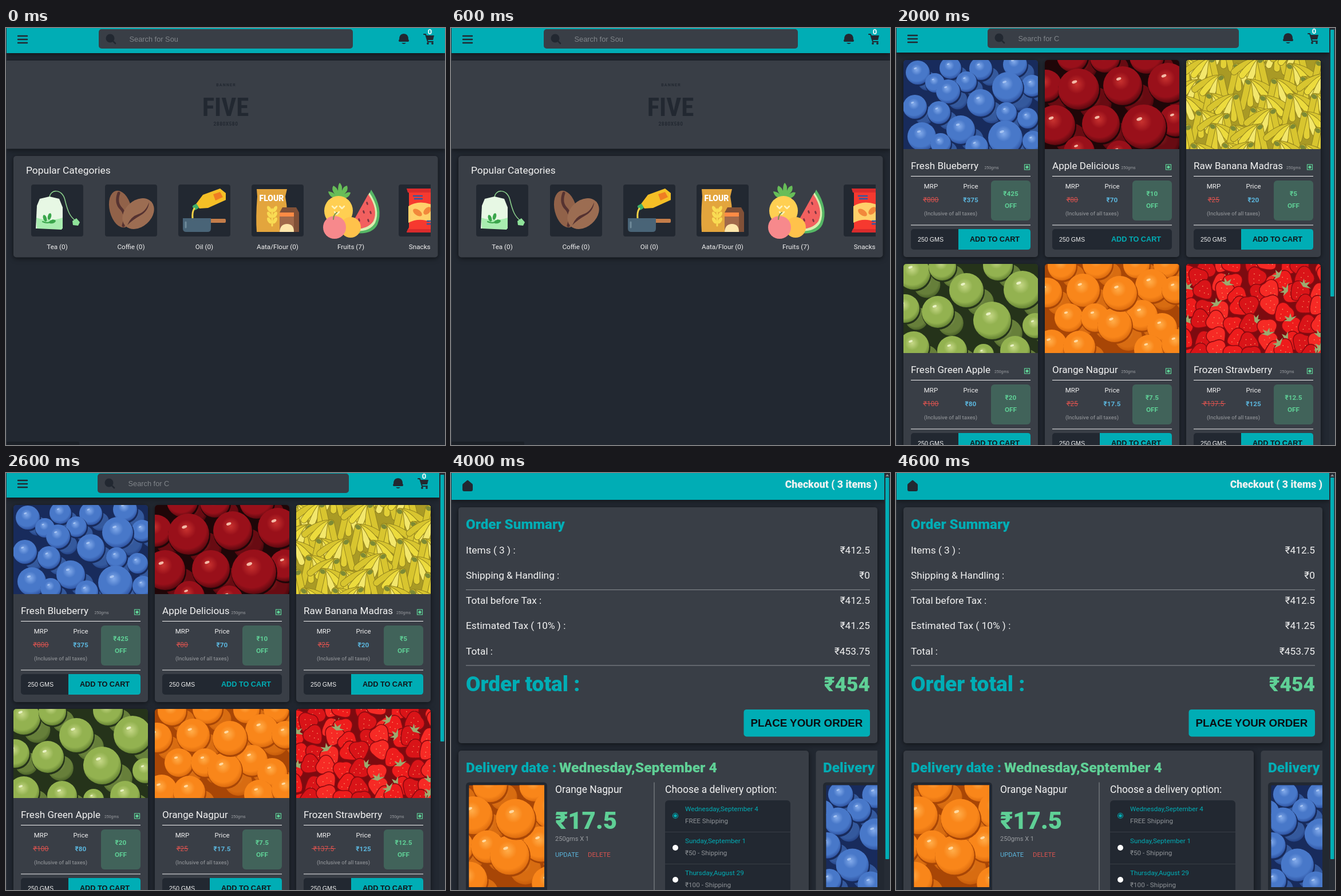
Recreate the animation shown at these times as an HTML page. Size 767 by 730 pixels, loop 5 s.

```html
<!DOCTYPE html>
<html lang="en">
<head>
<meta charset="utf-8">
<title>Grocery shop tour</title>
<style>
  html, body { margin: 0; width: 100%; height: 100%; overflow: hidden; background: #222831; }
  svg { display: block; }
  text { font-family: Roboto, "Noto Sans", sans-serif; white-space: pre; }
  .ui { font-family: "Liberation Sans", Arial, sans-serif; }
  .b { font-weight: 700; }
  .heavy { font-weight: 800; }
  .black { font-weight: 900; }
  .poster { font-family: "Roboto Condensed", Roboto, sans-serif; font-stretch: 75%; font-weight: 700; }
  .shadow { filter: drop-shadow(0 2px 4px #0008); }
</style>
</head>
<body>
<svg id="stage" width="767" height="730" viewBox="0 0 767 730"></svg>
<script>
const DARK = '#222831', PANEL = '#393e46', TEAL = '#00adb5', LIGHT = '#f2f2f2',
      GREEN = '#5fd096', RED = '#d9534f', BLUE = '#5bb5dc', GREY = '#9a9da1';

const text = (x, y, str, size, fill = LIGHT, cls = '', anchor = 'start') =>
  `<text x="${x}" y="${y}" font-size="${size}" fill="${fill}" class="${cls}" text-anchor="${anchor}">${str.replace(/&/g, '&amp;')}</text>`;
const mid = (x, y, str, size, fill, cls) => text(x, y, str, size, fill, cls, 'middle');
const end = (x, y, str, size, fill, cls) => text(x, y, str, size, fill, cls, 'end');
const rect = (x, y, w, h, fill, r = 0, more = '') =>
  `<rect x="${x}" y="${y}" width="${w}" height="${h}" rx="${r}" fill="${fill}" ${more}/>`;
const path = (d, fill, more = '') => `<path d="${d}" fill="${fill}" ${more}/>`;
const line = (d, color, w = 1) =>
  `<path d="${d}" fill="none" stroke="${color}" stroke-width="${w}" stroke-linecap="round" stroke-linejoin="round"/>`;
const oval = (x, y, rx, ry, fill, turn = 0) =>
  `<ellipse cx="${x}" cy="${y}" rx="${rx}" ry="${ry}" fill="${fill}" transform="rotate(${turn} ${x} ${y})"/>`;
const dot = (x, y, r, fill) => oval(x, y, r, r, fill);
const at = (x, y, body) => `<g transform="translate(${x} ${y})">${body}</g>`;

function seeded(seed) {
  return () => (seed = (seed * 16807) % 2147483647) / 2147483647;
}

/* Produce photos, simplified to shaded shapes on a 235 x 156 canvas */
const photo = (id, back, body) =>
  `<symbol id="${id}" viewBox="0 0 235 156" preserveAspectRatio="xMidYMid slice">${rect(0, 0, 235, 156, back)}${body}</symbol>`;

function pile(id, back, [shine, tone, shade], spots, glint) {
  const stops = [[0, shine], [.35, tone], [.72, tone], [1, shade]]
    .map(([o, c]) => `<stop offset="${o}" stop-color="${c}"/>`).join('');
  const ball = (x, y, r) => dot(x, y, r, `url(#${id}-ball)`);
  const behind = spots.map(([x, y, r]) => ball(x + r * .8, y + r * .7, r * .8)).join('');
  const front = spots.map(([x, y, r]) => dot(x + 1, y + 2, r + 1, back) + ball(x, y, r) +
    oval(x - r * .2, y - r * .35, r * .13, r * .07, glint, -20)).join('');
  return `<radialGradient id="${id}-ball" cx=".45" cy=".38" r=".66">${stops}</radialGradient>` +
    photo(id, back, `<g opacity=".6">${behind}</g>${front}`);
}

function bananas() {
  const rnd = seeded(17), tones = ['#d8c52f', '#ecdb3d', '#f3e76c', '#e3d036'];
  let out = '';
  for (let row = -1; row < 6; row++) for (let col = 0; col < 6; col++) {
    const x = col * 46 + (row & 1) * 22 + rnd() * 14 - 10, y = row * 29 + rnd() * 12, side = rnd() < .6 ? 1 : -1;
    for (let k = 0; k < 5; k++) {
      const d = `M${x} ${y}q${side * (24 - k * 7)} ${k * 5} ${side * (46 - k * 14)} ${20 + k * 6}`;
      out += line(d, '#93841f', 12) + line(d, tones[k % 4], 10);
    }
    out += oval(x, y, 5, 4, '#7d8a35', 30 * side);
  }
  return photo('banana', '#a99a25', out);
}

function strawberries() {
  const rnd = seeded(41);
  let out = '';
  for (let row = 0; row < 7; row++) for (let col = 0; col < 9; col++) {
    const x = col * 30 + rnd() * 20 - 12, y = row * 26 + rnd() * 16 - 8, turn = rnd() * 140 - 70;
    const seeds = [[-6, -2], [3, -5], [7, 3], [-2, 6], [2, 12]].map(([a, b]) => dot(a, b, .8, '#f9a06a')).join('');
    const cap = rnd() < .35 ? path('M0-9l-11-4 6-1-3-7 7 5 5-7 0 8 9 0z', '#9bab70') : '';
    out += `<g transform="translate(${x} ${y}) rotate(${turn})">` +
      path('M0-14C14-17 22-6 14 6Q7 19 0 20Q-7 19-14 6C-22-6-14-17 0-14', ['#ee1c1c', '#d91418', '#f62a25'][col % 3], 'stroke="#8c0a10" stroke-width="1.6"') +
      seeds + cap + '</g>';
  }
  return photo('strawberry', '#7d0b10', out);
}

const photos =
  pile('blueberry', '#182b5c', ['#82aaea', '#4878c9', '#284a97'],
    [[135, 15, 20], [82, 14, 19], [25, 22, 21], [195, 8, 21], [225, 45, 19], [55, 40, 17], [110, 38, 18],
     [182, 48, 27], [78, 55, 21], [20, 82, 21], [62, 92, 20], [135, 75, 24], [180, 92, 18], [100, 122, 25],
     [217, 102, 18], [32, 134, 25], [65, 146, 18], [128, 152, 20], [178, 136, 30], [226, 142, 18]], '#a5c3f2') +
  pile('apple', '#1f0608', ['#c8322f', '#99101a', '#4a060c'],
    [[2, 45, 28], [48, -6, 27], [105, -4, 26], [178, -6, 30], [215, 40, 35], [136, 45, 34], [59, 51, 36],
     [18, 114, 35], [98, 112, 33], [228, 106, 28], [173, 117, 39], [60, 160, 27], [130, 165, 24]], '#f3b9a6') +
  bananas() +
  pile('greenapple', '#25331a', ['#c6d887', '#93b250', '#58752b'],
    [[18, 16, 29], [68, 5, 24], [165, 3, 26], [3, 78, 25], [60, 84, 28], [110, 46, 30], [208, 45, 33],
     [230, 108, 22], [155, 99, 33], [85, 152, 26], [18, 145, 27], [195, 152, 26], [140, 158, 18]], '#e9f2c4') +
  pile('orange', '#a84606', ['#ffad4a', '#f9861a', '#d4640b'],
    [[30, 4, 25], [92, 0, 26], [160, 2, 23], [212, 2, 22], [4, 50, 26], [67, 46, 29], [187, 38, 29], [228, 45, 24],
     [42, 94, 25], [88, 94, 25], [170, 90, 27], [205, 112, 26], [12, 142, 27], [60, 145, 28], [182, 150, 26],
     [230, 140, 26], [122, 107, 30], [131, 51, 30]], '#ffd9a0') +
  strawberries();

/* Category pictures on a 91 x 91 tile */
const bottle = (x, tone, label) =>
  rect(x + 7, 10, 11, 7, '#f2f2f2', 2) +
  path(`M${x + 8} 17h9q1 10 6 16q3 6 1 14v30q0 4-4 4h-15q-4 0-4-4v-30q-2-8 1-14q5-6 6-16`, tone) +
  rect(x + 1, 38, 23, 14, label);

const icons = {
  tea:
    line('M32 24C32 8 54 6 59 27S68 56 77 63', '#8ed58f', 1.5) + path('M72 64l7-5 6 7-3 6-9-1z', '#8fe39a') +
    path('M15 25l17-4 17 4 6 15v37H8l2-40z', '#e7f8e4') + path('M9 58q23 8 46 0v18l-2 3-43-2z', '#a9edb0') +
    line('M20 65Q31 70 38 62', '#3aa64b', 2) + oval(24, 59, 3, 6, '#3aa64b', -20) + oval(32, 56, 3, 6, '#3aa64b', 15) +
    oval(37, 65, 3, 6, '#3aa64b', 75),
  coffee:
    oval(27, 43, 19, 33, '#916249', -14) + line('M24 15Q18 32 28 42T32 72', '#563331', 5) +
    oval(58, 51, 31, 23, '#9c6d52', -42) + path('M39 71Q45 56 58 52T77 31Q76 46 62 54T39 71', '#553231'),
  oil:
    path('M31 34l12-16 30-11 10 8 0 12-31 14-15 1z', '#f5bf26') + path('M61 17l12-4 5 9-13 6z', '#ef7d23') +
    rect(26, 35, 9, 9, '#3fae68', 2, 'transform="rotate(-30 30 40)"') + line('M28 42Q24 48 25 59', '#f9d548', 3) +
    rect(55, 60, 28, 7, '#c47d4a', 2) + path('M8 59h49v18q0 6-6 6H14q-6 0-6-6z', '#496477') +
    line('M13 66v9', '#6f8999', 3),
  flour:
    path('M9 8h53l-3 13q6 30 1 60l2 2H9q-2-25 1-62z', '#e3a53d') + mid(35, 29, 'FLOUR', 14, '#fff', 'black') +
    line('M36 43v29', '#f9dc53', 3) +
    [40, 50, 60].map(y => oval(31, y + 3, 3, 6, '#f9dc53', -30) + oval(41, y + 3, 3, 6, '#f9dc53', 30)).join('') +
    path('M49 49l5-9h24l5 9v34H49z', '#805037') + path('M49 49h25v34H49z', '#a1694a') +
    rect(49, 49, 25, 7, '#ff8b45') + path('M49 83q1-14 13-14t12 14z', '#ffe6ab'),
  fruits:
    path('M25 26Q8 24 6 12q9 1 12 6Q10 8 15 2q6 3 8 9Q23 0 26-3q5 4 4 14 2-8 9-9 3 8-5 15 6-5 11-3-2 10-17 12z', '#67bd58') +
    oval(24, 46, 25, 26, '#ffcf52') + line('M13 38l4 4 4-4m5 0l4 4 4-4m-17 10l4 4 4-4', '#fff2bb', 2.5) +
    path('M81 9Q103 42 92 70Q82 90 46 84z', '#55b765') + path('M78 14Q98 44 88 67Q78 85 45 81z', '#d9efb0') +
    path('M76 17Q94 44 85 64Q75 80 42 78z', '#f2605f') +
    [[74, 33], [80, 49], [68, 48], [76, 63], [60, 62]].map(([x, y]) => oval(x, y, 1.5, 3, '#7c3440', -20)).join('') +
    dot(45, 75, 18, '#ffc24b') + dot(17, 75, 20, '#f7898c') + line('M15 61Q15 53 21 49', '#77914c', 2),
  snacks:
    path('M14 7h70v76H14l4-8V15z', '#f6392f') + path('M14 7h70v7H16zM16 78h70v6H14z', '#d92b2c') +
    path('M17 38Q35 26 60 36V68Q38 56 17 67z', '#ffd06a') + line('M26 20h15m-13 5h13m9 39h12m-12 5h10', '#2e5aa5', 2.5) +
    oval(33, 49, 9, 5, '#f2883b', 35) + oval(50, 46, 8, 5, '#f2883b', -45),
  cleaning:
    rect(21, 6, 11, 9, '#ec5250') + path('M20 15h13q3 8 3 13v14H17V28q0-5 3-13', '#7a6aa0') +
    path('M40 8q15-4 26 0l-2 4h-8v9h-8v-7z', '#ff7b22') + path('M45 20h10l5 22H40z', '#f2f2f2') +
    path('M10 35h55l-7 47H18z', '#3f93d2') + rect(8, 33, 59, 10, '#57a9de', 2) +
    path('M25 40h19v13q11 0 9 5-6-2-7 12H30z', '#a5ddec') + rect(50, 62, 33, 23, '#f7a63c', 9) +
    [[59, 69], [70, 68], [76, 76], [65, 78]].map(([x, y]) => dot(x, y, 2, '#cf7921')).join(''),
  drinks:
    bottle(9, '#ff7900', '#f8a532') + bottle(32, '#582d24', '#e94442') + bottle(56, '#78b352', '#c7d34b') +
    path('M47 44h25l-3 37H50z', '#ff9d20') + rect(46, 43, 26, 7, '#f2f2f2', 2),
  pet:
    path('M6 28l8-20h39l3 20v54H6z', '#c38a50') + path('M48 28l7-17 2 71H42V35z', '#946437') +
    rect(12, 7, 37, 14, '#bfc6c8', 2) + rect(19, 12, 24, 3, '#38424c') + dot(23, 56, 15, '#d0d3d0') +
    oval(23, 60, 6, 5, '#76583e') + [[15, 56], [20, 50], [26, 50], [31, 56]].map(([x, y]) => dot(x, y, 2.6, '#76583e')).join('') +
    path('M45 73q5-12 19-12t19 12z', '#b4743e') + path('M46 71h35l4 12H41z', '#d5324b'),
  stationery:
    path('M32 10Q8 25 8 48t25 32z', '#315ce6') + path('M13 6h35v75Q23 66 16 43z', '#f9b517') +
    path('M13 6h35v9H13z', '#ffcf35') + path('M26 45l5-8 5 8v30H26z', '#19b7dc') + path('M26 45l5-8 5 8z', '#ffe0a4')
};

const shelf = (y, tiles) => `<g clip-path="url(#shelf)">${tiles.map(([x, icon, label]) =>
  (icon === 'fruits' ? '' : rect(x, y, 91, 91, DARK, 4)) + at(x, y, icons[icon]) +
  mid(x + 45.5, y + 113, label, 11.7)).join('')}</g>`;

const bar = (right, height) => rect(1, -5, right - 1, height + 5, TEAL, 0, 'class="shadow"');
const home = y => path(`M20 ${y + 8}q0-2 2-3l6-5q1-1 2 0l6 5q2 1 2 3v8q0 3-3 3H23q-3 0-3-3z`, DARK);

function header(dy, right, boxX, boxW, query, menuOpen) {
  const bell = right - 72, cart = right - 28;
  const menu = line('M21 14h16m-16 6h16m-16 6h16', DARK, 2.4);
  return bar(right, 44 + dy) + at(0, dy,
    (menuOpen ? `<g transform="rotate(90 29 20)">${menu}</g>` : menu) +
    rect(boxX, 2, boxW, 34, PANEL, 5) +
    dot(boxX + 20, 18, 7.5, DARK) + line(`M${boxX + 24} 22l5 5`, DARK, 2.6) +
    text(boxX + 53.5, 23.5, query, 12.8, '#80858a', 'ui') +
    path(`M${bell - 8} 24q-2-2 0-4 0-10 8-10t8 10q2 2 0 4zM${bell - 4} 26h8q-4 4-8 0z`, DARK) +
    at(cart, 0, line('M-9 11h3l4 13h9', DARK, 2) + path('M-5 13H9L7 21H-3z', DARK) +
      dot(-2, 27, 1.9, DARK) + dot(6, 27, 1.9, DARK) + mid(1.5, 10.5, '0', 13, '#fff', 'b')));
}

const banner = (y, word) => rect(1, y, 766, 154.5, PANEL, 0, 'class="shadow"') +
  `<g letter-spacing="1.2">${mid(384.5, y + 45, 'BANNER', 7, DARK, 'b')}</g>` +
  mid(383.5, y + 97, word, 45, DARK, 'poster') +
  `<g letter-spacing=".5">${mid(384, y + 114, '2880X580', 8.4, DARK, 'b')}</g>`;

const scrollbar = (top, bottom) => rect(757, 0, 10, 730, '#262c35') + rect(759, top, 6.5, bottom - top, TEAL, 1);

function homeScene() {
  return header(0, 767, 162, 444, 'Search for Sou') + banner(57, 'FIVE') +
    rect(13, 224, 741.5, 177.5, PANEL, 5, 'class="shadow"') + text(35, 255, 'Popular Categories', 17.4) +
    shelf(274, [[44, 'tea', 'Tea (0)'], [173, 'coffee', 'Coffie (0)'], [301, 'oil', 'Oil (0)'],
      [429, 'flour', 'Aata/Flour (0)'], [557, 'fruits', 'Fruits (7)'], [686, 'snacks', 'Snacks (0)']]) +
    rect(0, 724, 128, 8, '#1b2027', 2);
}

function menuScene() {
  const sign = (y, turn) => `<g transform="rotate(${turn} 274 ${y})">${line(`M268.5 ${y}h11.5m-5.75-5.75v11.5`, DARK, 3.6)}</g>`;
  const section = (y, name, turn) => rect(1, y, 306, 53.5, TEAL) + text(13, y + 31.5, name, 16.8) + sign(y + 26.5, turn);
  const items = ['Dals', 'Pulses', 'Dry Fruits', 'Cooking Oil', 'Ghee & Vanaspati', 'Flours & Grains', 'Rice', 'Spices',
    'Salt / Sugar / Jaggery'];
  return banner(58, 'THREE') + rect(13, 224.5, 741.5, 178, PANEL, 5, 'class="shadow"') +
    shelf(275, [[323, 'cleaning', 'Cleaning (0)'], [451, 'drinks', 'Drinks (0)'],
      [579.5, 'pet', 'Pet Supplies (0)'], [708, 'stationery', 'Stationery (0)']]) +
    rect(1, 58, 306, 672, DARK) + section(57.5, 'GROCERY', 45) +
    items.map((name, i) => {
      const y = 123.5 + i * 52.65;
      return rect(13, y, 282, 46, PANEL, 4) + text(26, y + 25.5, name, 11.6);
    }).join('') +
    section(603, 'DAIRY & BEVERAGES', 0) + section(675, 'PACKAGED FOOD', 0) +
    header(1, 767, 162, 444, 'Search for Noodl', true);
}

function productCard(x, y, [image, name, tagX, mrp, price, off], hover) {
  const rule = v => rect(13, v, 209, 1, LIGHT);
  const buy = hover ? '' : path('M96 296h121q5 0 5 5v26q0 5-5 5H96z', TEAL);
  return at(x, y, rect(0, 0, 235, 345, PANEL, 5, 'class="shadow"') +
    `<g clip-path="url(#card)"><use href="#${image}" width="235" height="156"/></g>` +
    text(13, 190.5, name, 17.1) + text(tagX, 191, '250gms', 6.9, GREY) +
    rect(211.5, 183, 9, 9, 'none', 0, `stroke="${GREEN}" stroke-width="1.2"`) + dot(216, 187.5, 2.6, GREEN) +
    rule(203) + mid(48, 224.5, 'MRP', 11.5) + mid(117.5, 224.5, 'Price', 11.5) +
    mid(48, 248.5, mrp, 12, RED) + rect(48 - mrp.length * 3.5, 244, mrp.length * 7, 1, RED) +
    mid(117.5, 248.5, price, 11.8, BLUE, 'b') + mid(82.5, 272, '(Inclusive of all taxes)', 9.6, GREY) +
    rect(153, 211, 69, 70, '#41635a', 6) + mid(187.5, 237.5, off, 11.8, GREEN, 'b') + mid(187.5, 259, 'OFF', 11.8, GREEN, 'b') +
    rule(288.5) + rect(13, 296, 209, 36, DARK, 5) + buy +
    text(25, 318, '250 GMS', 10.7, LIGHT, 'ui') + mid(159.5, 317.5, 'ADD TO CART', 12.7, hover ? TEAL : '#11151a', 'ui b'));
}

function productScene() {
  const goods = [
    ['blueberry', 'Fresh Blueberry', 141.5, '₹800', '₹375', '₹425'],
    ['apple', 'Apple Delicious', 133.5, '₹80', '₹70', '₹10'],
    ['banana', 'Raw Banana Madras', 175, '₹25', '₹20', '₹5'],
    ['greenapple', 'Fresh Green Apple', 159, '₹100', '₹80', '₹20'],
    ['orange', 'Orange Nagpur', 133.5, '₹25', '₹17.5', '₹7.5'],
    ['strawberry', 'Frozen Strawberry', 163.5, '₹137.5', '₹125', '₹12.5']];
  return goods.map((item, i) => productCard(13 + i % 3 * 247, 56 + Math.floor(i / 3) * 357, item, i === 1)).join('') +
    header(-1, 757, 160, 439, 'Search for C') + scrollbar(3, 470);
}

function summary(dy, right, count, values, total) {
  const edge = right - 13, rows = [`Items ( ${count} ) :`, 'Shipping & Handling :', 'Total before Tax :', 'Estimated Tax ( 10% ) :', 'Total :'];
  const ready = count > 0;
  return at(0, dy, rect(13, 57.5, right - 13, 413, PANEL, 5, 'class="shadow"') +
    text(26, 96, 'Order Summary', 24.2, TEAL, 'heavy') +
    rows.map((row, i) => {
      const y = 138.5 + i * 44.2;
      return text(26, y, row, 17.3) + end(edge, y, values[i], 17.3);
    }).join('') +
    rect(26, 201.5, edge - 26, 1, '#8b8f94') + rect(26, 334, edge - 26, 1, '#8b8f94') +
    text(26, 380, 'Order total :', 37, TEAL, 'heavy') + end(edge, 380, total, 35.4, GREEN, 'heavy') +
    rect(edge - 220.5, 411.5, 220.5, 47.5, ready ? TEAL : '#1b757d', 5) +
    mid(edge - 110.5, 441.5, 'PLACE YOUR ORDER', 18.8, ready ? '#0b0e12' : '#29333c', 'ui b'));
}

const checkoutBar = (right, height, y, count) =>
  bar(right, height) + home(height - 34) + end(right - 12.5, y, `Checkout ( ${count} items )`, 17.7, LIGHT, 'heavy');

function emptyCartScene() {
  return checkoutBar(767, 45, 24, 0) + summary(0, 754.5, 0, ['₹0', '₹0', '₹0', '₹0.00', '₹0.00'], '₹0');
}

function deliveryScene() {
  const options = [['Wednesday,September 4', 'FREE Shipping'], ['Sunday,September 1', '₹50 - Shipping'],
    ['Thursday,August 29', '₹100 - Shipping']];
  const picture = (x, image) => rect(x, 541.5, 142, 200, DARK, 6) +
    `<use href="#${image}" x="${x + 5.5}" y="546.5" width="131.5" height="178.5"/>`;
  return checkoutBar(757.5, 47, 26, 3) +
    summary(2.4, 745, 3, ['₹412.5', '₹0', '₹412.5', '₹41.25', '₹453.75'], '₹454') +
    rect(13, 486, 612, 260, PANEL, 5, 'class="shadow"') +
    text(26, 524, 'Delivery date :', 24.4, TEAL, 'heavy') + text(189, 524, 'Wednesday,September 4', 24.7, GREEN, 'heavy') +
    picture(26, 'orange') + text(182, 560, 'Orange Nagpur', 17.5) +
    text(182, 623, '₹17.5', 42, GREEN, 'black') + text(182, 644, '250gms X 1', 11.1, GREY) +
    text(182, 671.5, 'UPDATE', 11.2, BLUE) + text(239, 671.5, 'DELETE', 11.3, RED) +
    rect(354.5, 541.5, 1, 200, '#8b8f94') + text(374, 560, 'Choose a delivery option:', 17.5) +
    rect(374, 573, 219, 180, DARK, 6) +
    options.map(([day, cost], i) => {
      const y = 600 + i * 56;
      return (i ? rect(374, y - 28, 219, 1, PANEL) : dot(392, y, 5, TEAL) + dot(392, y, 4, DARK)) +
        dot(392, y, i ? 5 : 2.8, i ? '#fff' : TEAL) +
        text(409, y - 8, day, 11.7, TEAL) + text(409, y + 13, cost, 11.7, '#8f9397');
    }).join('') +
    `<g clip-path="url(#second)">${rect(637.5, 486, 200, 260, PANEL, 5)}` +
    text(650, 524, 'Delivery', 24.4, TEAL, 'heavy') + picture(650, 'blueberry') + '</g>' +
    scrollbar(8, 676) + path('M759 6l3.2-4 3.3 4z', '#8b8f94');
}

const scenes = [homeScene, menuScene, productScene, emptyCartScene, deliveryScene];
const stage = document.getElementById('stage');
stage.innerHTML =
  `<defs><clipPath id="shelf">${rect(0, 0, 742, 730)}</clipPath>` +
  `<clipPath id="card">${rect(0, 0, 235, 170, '#000', 5)}</clipPath>` +
  `<clipPath id="second">${rect(630, 480, 115, 250)}</clipPath>${photos}</defs>` +
  rect(0, 0, 767, 730, DARK) +
  scenes.map(scene => `<g class="scene">${scene()}</g>`).join('') +
  rect(0, 0, 1, 730, '#30363f');

const groups = [...stage.querySelectorAll('.scene')];
const SCENE_MS = 1000;
const start = performance.now();

function update(ms) {
  const current = Math.floor(ms / SCENE_MS) % groups.length;
  groups.forEach((g, i) => { g.style.display = i === current ? '' : 'none'; });
}
function tick() {
  update(performance.now() - start);
  requestAnimationFrame(tick);
}
tick();
</script>
</body>
</html>
```
